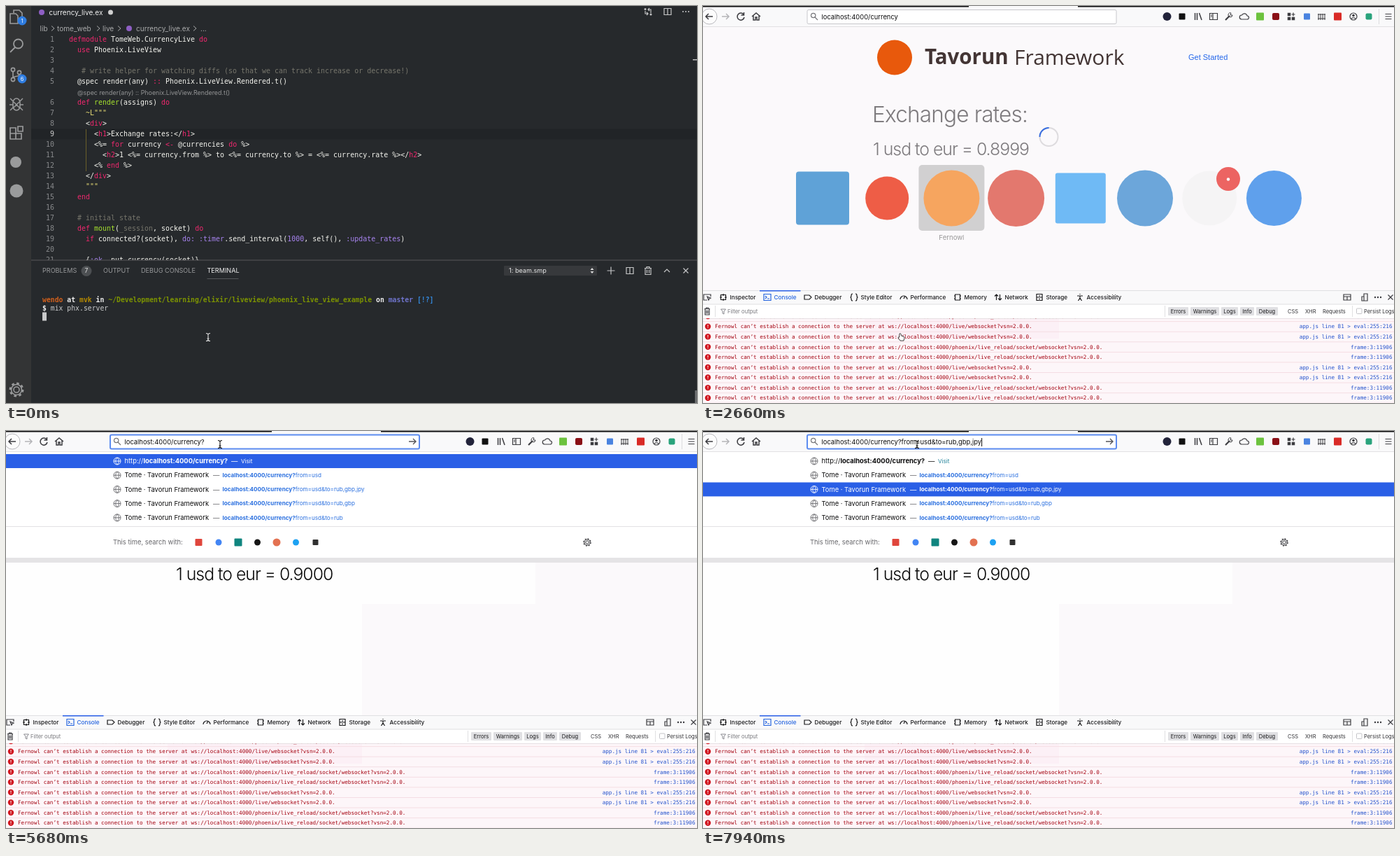
Animation of 988x567 px, one loop 8000 ms. Source, as an HTML page:

```html
<!DOCTYPE html>
<html lang="en">
<head>
<meta charset="utf-8">
<title>Currency live view</title>
<style>
  html, body { margin: 0; width: 100%; height: 100%; overflow: hidden; background: #26292c; }
  svg { display: block; }
  text { font-family: Inter, "Open Sans", sans-serif; white-space: pre; }
  .mono { font-family: "DejaVu Sans Mono", monospace; }
  .logo { font-family: "Open Sans", sans-serif; }
  .light { font-weight: 300; }
  .bold { font-weight: 700; }
  .end { text-anchor: end; }
  .mid { text-anchor: middle; }
</style>
</head>
<body>
<svg id="stage" width="988" height="567" viewBox="0 0 988 567">
  <defs>
    <clipPath id="codeClip"><rect width="988" height="363"/></clipPath>
    <clipPath id="logClip"><rect y="446" width="988" height="121"/></clipPath>
  </defs>
  <g id="editor"><g id="workbench"></g><g id="terminal"></g></g>
  <g id="browser"><g id="page"></g><g id="chrome"></g><g id="menu"></g><g id="address"></g><g id="caret"></g></g>
  <g id="switcher"></g>
  <g id="pointer"></g>
</svg>
<script>
const LOOP = 8000, STEP = 148.6;
const BLUE = '#2a5fe6', INK = '#0c0c0d', ICON = '#3c3c40';
const $ = id => document.getElementById(id);
const esc = s => s.replace(/&/g, '&amp;').replace(/</g, '&lt;');

const text = (x, y, s, size, fill, cls = '', extra = '') =>
  `<text x="${x}" y="${y}" dy=".35em" font-size="${size}" fill="${fill}" class="${cls}" ${extra}>${s}</text>`;
const span = (fill, s, cls = '') => `<tspan fill="${fill}" class="${cls}">${esc(s)}</tspan>`;
const rect = (x, y, w, h, fill, r = 0, extra = '') =>
  `<rect x="${x}" y="${y}" width="${w}" height="${h}" rx="${r}" fill="${fill}" ${extra}/>`;
const disc = (x, y, r, fill, extra = '') => `<circle cx="${x}" cy="${y}" r="${r}" fill="${fill}" ${extra}/>`;
const square = (x, y, size, fill, r = 1) => rect(x - size / 2, y - size / 2, size, size, fill, r);
const line = (x, y, d, color, width = 1.2, fill = 'none') =>
  `<path transform="translate(${x} ${y})" d="${d}" fill="${fill}" stroke="${color}" stroke-width="${width}"/>`;
const gear = (x, y, r, color, width) =>
  disc(x, y, r * .4, 'none', `stroke="${color}" stroke-width="${width}"`) +
  disc(x, y, r * .75, 'none', `stroke="${color}" stroke-width="${width}"`) +
  disc(x, y, r * .92, 'none', `stroke="${color}" stroke-width="${r * .25}" stroke-dasharray="${r * .36}"`);
const ring = r => `M${-r} 0a${r} ${r} 0 1 0 ${2 * r} 0a${r} ${r} 0 1 0 ${-2 * r} 0`;
const box = (w, h) => `M${-w / 2} ${-h / 2}h${w}v${h}h${-w}z`;

const last = {};
function set(id, html) {
  if (last[id] !== html) $(id).innerHTML = last[id] = html;
}

// Code editor
const CODE = `defmodule TomeWeb.CurrencyLive do
  use Phoenix.LiveView

   # write helper for watching diffs (so that we can track increase or decrease!)
  @spec render(any) :: Phoenix.LiveView.Rendered.t()
  def render(assigns) do
    ~L"""
    <div>
      <h1>Exchange rates:</h1>
      <%= for currency <- @currencies do %>
        <h2>1 <%= currency.from %> to <%= currency.to %> = <%= currency.rate %></h2>
      <% end %>
    </div>
    """
  end

  # initial state
  def mount(_session, socket) do
    if connected?(socket), do: :timer.send_interval(1000, self(), :update_rates)

    {:ok, put_currency(socket)}`.split('\n');
const TOKEN = /(#.*|~L|"""|\b(?:defmodule|use|def|end|for|if|do(?!:)|h[12]|div)\b|<-|::|(?<=def )\w+|do:|:[a-z]\w+|1000|_session)/;

function tokenColor(token) {
  if (token[0] === '#') return '#77766c';
  if (/^[~"]/.test(token)) return '#e6db74';
  if (/^(:[a-z]|do:|1000)/.test(token)) return '#a884f0';
  if (token === '_session') return '#77766c';
  return /render|mount/.test(token) ? '#a6e22e' : '#f0286e';
}
const highlight = s => s.split(TOKEN).map((p, i) => i % 2 ? span(tokenColor(p), p) : esc(p)).join('');

function drawWorkbench() {
  const grey = '#c5c6c7', dim = '#98999b', side = '#9a9b9c';
  const lineY = n => n < 6 ? 48 + 14.95 * (n - 1) : 138 + 14.95 * (n - 6);
  let s = rect(0, 0, 988, 567, '#26292c') + rect(0, 0, 36, 567, '#333435');
  s += rect(36, 175.5, 952, 15, '#212427') + rect(114, 176, 1, 60, '#6b5f2a');

  s += '<g clip-path="url(#codeClip)">' + CODE.map((row, i) =>
    text(69, lineY(i + 1), i + 1, 9.97, i === 8 ? '#d0d0d0' : '#87898b', 'mono end') +
    text(90, lineY(i + 1), highlight(row), 9.97, '#f4f4ee', 'mono')).join('') + '</g>';
  s += text(102, 124, '@spec render(any) :: Phoenix.LiveView.Rendered.t()', 8.9, '#949596');

  s += disc(51, 9, 4, '#8e5fc4') + text(61.5, 9, 'currency_live.ex', 10.1, '#f0f0f0') + disc(149.5, 9, 3.5, '#d0d0d0');
  [[48.5, 'lib'], [73, 'tome_web'], [138, 'live'], [186, 'currency_live.ex'], [278, '...']]
    .forEach(([x, name]) => s += text(x, 32, name, 10.1, '#a9aaab'));
  [67, 132, 162, 270].forEach(x => s += line(x, 32, 'M-2-3.5L2 0L-2 3.5', '#a9aaab', 1));
  s += disc(176, 32, 4, '#8e5fc4');

  s += line(918, 8, 'M-4-1V3h4M-2 1L0 3L-2 5M4 2V-3H0M2-5L0-3L2-1', grey) + disc(914, 4.5, 1.5, grey) + disc(922, 12, 1.5, grey);
  s += line(946, 8, box(10, 9) + 'M0-4.5v9', grey);
  [968, 972, 976].forEach(x => s += disc(x, 8, 1, grey));
  s += rect(982, 76, 6, 1.5, '#c0c0c0');

  // Activity bar
  s += line(15, 15, 'M-9-4h8l3 3V10H-9zM-4-5V-9H4L8-5V5H3', side, 1.6);
  s += line(15, 56, 'M-2 3L-9 10' + 'M-4-2a6.5 6.5 0 1 0 13 0a6.5 6.5 0 1 0-13 0', side, 1.8);
  s += line(14, 98, 'M-4-4V5M5 0C5 4-4 1-4 5', side, 1.6);
  [[10, 91], [10, 105], [19, 95]].forEach(([x, y]) => s += disc(x, y, 2.6, '#333435', `stroke="${side}" stroke-width="1.6"`));
  s += line(15, 140, 'M-5-2a5 6 0 0 1 10 0V3a5 6 0 0 1-10 0zM-9-8L-5-4M9-8L5-4M-10 1h5M5 1h5M-9 9L-5 5M9 9L5 5M-4-3L4 5M4-3L-4 5', side, 1.5);
  s += line(14, 182, 'M-8-8h8v16H-8zM-8 0H8V8H-8M3-10h7v7H3z', side, 1.7);
  s += disc(14, 223, 8, side) + disc(15, 264, 9.5, side) + gear(15, 548, 10, side, 1.6);
  [[21, 1], [104, 6]].forEach(([y, n]) => s += disc(23, y, 6.5, '#2f7de1') + text(23, y, n, 7.5, '#fff', 'mid'));

  // Panel header
  s += rect(36, 362.5, 952, 1, '#58595b');
  [[52, 'PROBLEMS'], [139, 'OUTPUT'], [193, 'DEBUG CONSOLE'], [287.5, 'TERMINAL']]
    .forEach(([x, name]) => s += text(x, 378, name, 9.1, x > 280 ? '#eee' : dim));
  s += rect(287.5, 389, 45, 1, '#55575a') + disc(115, 378.5, 7.5, '#4c4f52') + text(115, 378.5, 7, 8.5, '#e8e8e8', 'mid');
  s += rect(712, 371, 133, 14, '#37393c', 1) + text(719, 378, '1: beam.smp', 9.1, '#e8e8e8');
  s += line(838, 378, 'M-2.5-1L0-4L2.5-1zM-2.5 1L0 4L2.5 1z', 'none', 0, '#ddd');
  s += line(865, 378, 'M-5.5 0h11M0-5.5v11', grey) + line(892, 378, box(10, 9) + 'M0-4.5v9', grey);
  s += line(918, 378, 'M-5-3.5H5M-2-4V-5.5h4V-4M-4-3V5.5H4V-3M-1.5-1.5v5M1.5-1.5v5', grey);
  s += line(945, 378, 'M-4 2L0-2L4 2', grey) + line(972, 378, 'M-3.5-3.5l7 7M3.5-3.5l-7 7', grey);
  s += rect(985, 549, 3, 18, '#6a6c6e');
  set('workbench', s);
}

function drawTerminal(t) {
  const prompt = span('#d2601c', 'wendo', 'bold') + span('#eee', ' at ', 'bold') + span('#b58900', 'mvk', 'bold') +
    span('#eee', ' in ', 'bold') + span('#7d9400', '~/Development/learning/elixir/liveview/phoenix_live_view_example', 'bold') +
    span('#eee', ' on ', 'bold') + span('#6f74cc', 'master ', 'bold') + span('#3488dc', '[!?]', 'bold');
  const rows = [prompt, span('#eee', '$', 'bold') + ' mix phx.server'];
  if (t >= 990) rows.push('[info] Running TomeWeb.Endpoint with cowboy 2.6.3 at 0.0.0.0:4000 (http)');
  if (t >= 1130) rows.push('[info] Access TomeWeb.Endpoint at http://localhost:4000');
  if (t >= 1580) rows.push('', 'Webpack is watching the files…', '');
  const y = i => 420 + 11.75 * i;
  set('terminal', rows.map((row, i) => text(52, y(i), row, 9.79, '#c9cacb', 'mono')).join('') +
    rect(52, y(rows.length) - 6, 6, 12, '#c9cacb'));
}

// Browser
function drawChrome() {
  const grey = '#b5b5b8';
  let s = rect(0, 0, 988, 29, '#f9f9fa') + rect(0, 0, 380, 1.5, INK) + rect(536, 0, 452, 1.5, INK) + rect(0, 29, 988, 1, '#e2e1e3');
  s += disc(9, 15, 11, '#fcfcfc', 'stroke="#b9b9bd"') + line(9, 15, 'M5 0H-5M-1-4L-5 0L-1 4', ICON, 1.5);
  s += line(32, 15, 'M-5 0H5M1-4L5 0L1 4', grey, 1.5) + line(54, 15, 'M4-3A5 5 0 1 0 5 1M4.5-6v4h-4', ICON, 1.5);
  s += line(76, 15, 'M-6 0L0-5L6 0M-4-1V5h3V1h2v4h3V-1', ICON, 1.5);

  s += disc(663.5, 15, 6, '#22233a') + square(685, 15, 9, '#111');
  s += line(708, 15, 'M-4.5-5V5M-1.5-5V5M1.5-5L5 5', ICON, 1.5) + line(730, 15, box(11, 9) + 'M-1-4V4M-4-2h2M-4 0h2', ICON);
  s += line(752, 15, 'M-5 5L1-1', ICON, 2.2) + line(752, 15, 'M3-5A3 3 0 1 0 5-2L2-2z', ICON, 1);
  s += line(774, 15, 'M-4 4h8a2.5 2.5 0 0 0 0-5a4 4 0 0 0-7.5-1a3 3 0 0 0-.5 6z', ICON);
  s += square(796.5, 15, 11, '#6cc23e') + square(819, 15, 10, '#8a0f16', 2);
  [[838, 12], [838, 18], [844, 18]].forEach(([x, y]) => s += square(x, y, 4.5, ICON, 0));
  s += line(844, 12, 'M-2.5 0h5M0-2.5v5', ICON) + square(863.5, 15, 9, '#4a83e0');
  s += line(885, 15, 'M-5-4v9M-2-4v9M1-4v9M4-4v9M-6-3H5M-6 3H5', ICON, 1) + square(907.5, 15, 11, '#d92b27');
  s += disc(930, 15, 5, 'none', `stroke="${ICON}" stroke-width="1.2"`) + disc(930, 13.5, 1.8, ICON) + line(930, 15, 'M-3 3Q0 .5 3 3', ICON);
  s += square(952, 15, 9, '#29a37c', 2) + rect(966, 4, 1, 22, '#dcdcdf') + line(980, 15, 'M-4.5-3.5h9M-4.5 0h9M-4.5 3.5h9', ICON);
  set('chrome', s + drawDevtools());
}

function drawDevtools() {
  const glyphs = [
    [29, 'Inspector', box(7, 7) + 'M0-5v3M0 2v3M-5 0h3M2 0h3'], [92, 'Console', box(10, 9) + 'M-3-2l2 2l-2 2M0 2h3'],
    [150, 'Debugger', 'M-5-3H2L5 0L2 3H-5z'], [216, 'Style Editor', 'M-2-5q-2 0-2 2.5T-5.5 0Q-4 0-4 2.5T-2 5M2-5q2 0 2 2.5T5.5 0Q4 0 4 2.5T2 5'],
    [287, 'Performance', 'M-5 3a5 5 0 1 1 10 0M0 2L2-2'], [364, 'Memory', box(7, 8) + 'M-5-2h2M-5 2h2M3-2h2M3 2h2'],
    [422, 'Network', 'M-2.5 4V-4M-5-1.5L-2.5-4L0-1.5M2.5-4V4M0 1.5L2.5 4L5 1.5'], [481, 'Storage', box(8, 9) + 'M-4 0h8M-1-2h2M-1 2.5h2'],
    [539, 'Accessibility', 'M-4-2h8M0-2V1L-2.5 5M0 1L2.5 5M0-5v1']];
  let s = rect(0, 406, 988, 20, '#f9f9fa') + rect(0, 406, 988, 1, '#e0e0e2') + rect(0, 426, 988, 20, '#fff') +
    rect(0, 425.5, 988, 1, '#e0e0e2') + rect(0, 446, 988, 1, '#e6e0e3') + rect(81, 406, 58.5, 1.5, BLUE);
  s += line(6, 416, 'M0 4H-5V-4H5V-1M0-1l5 2l-2 1l-1 2z', ICON);
  glyphs.forEach(([x, name, d]) => {
    const color = name === 'Console' ? '#2464df' : '#18181a';
    s += line(x, 416, d, color) + text(x + 9.5, 416, name, 8.2, color, '', 'font-weight="500"');
  });
  s += line(921, 416, box(10, 8) + 'M-5-1H5M0-1V4', ICON) + line(946, 416, 'M-1-5H4V5H-1zM-4-1h3v6h-3z', ICON);
  [961, 965, 969].forEach(x => s += disc(x, 416, 1.2, ICON));
  s += line(983, 416, 'M-3.5-3.5l7 7M3.5-3.5l-7 7', ICON);

  s += line(6, 436, 'M-4-3.5H4M-1.5-4v-1h3v1M-3-3V5H3V-3M-1-1.5v5M1-1.5v5', ICON) + rect(17, 428, 1, 16, '#e0e0e2');
  s += line(29, 436, 'M-3.5-3h7L1 0V4L-1 3V0z', '#8a8a90', 1) + text(35, 436, 'Filter output', 7.6, '#77777c');
  [[665, 29, 'Errors'], [697, 41, 'Warnings'], [741, 24, 'Logs'], [768, 20, 'Info'], [791, 31, 'Debug']].forEach(([x, w, name]) =>
    s += rect(x, 430, w, 12, '#e0e0e3', 1) + text(x + w / 2, 436, name, 7.5, '#18181a', 'mid'));
  [[836, 'CSS'], [861, 'XHR'], [886, 'Requests'], [945, 'Persist Logs']].forEach(([x, name]) => s += text(x, 436, name, 7.5, '#303034'));
  s += rect(660, 428, 1, 16, '#e0e0e2') + rect(928, 428, 1, 16, '#e0e0e2') + rect(934.5, 432, 7.5, 7.5, '#fff', 1, 'stroke="#c4c4c8"');

  s += '<g clip-path="url(#logClip)">' + rect(0, 447, 988, 120, '#fdf6f9') + rect(231, 447, 278, 28, '#fcf0f6');
  for (let i = -1; i < 8; i++) {
    const y = 457.7 + 14.57 * i, reload = i & 2;
    const path = reload ? 'phoenix/live_reload/socket' : 'live';
    s += rect(0, y + 7, 988, 1, '#f5dde3') + disc(7, y, 4.2, '#d0151f') + rect(6.5, y - 2.5, 1, 3, '#fff') + rect(6.5, y + 1.3, 1, 1, '#fff');
    s += text(17, y, `Fernowl can’t establish a connection to the server at ws://localhost:4000/${path}/websocket?vsn=2.0.0.`, 7.62, '#a4000f', 'mono');
    s += text(985.5, y, reload ? 'frame:3:11906' : 'app.js line 81 &gt; eval:255:216', 7.62, '#2050cc', 'mono end');
  }
  return s + '</g>';
}

function drawPage(t, clock) {
  const online = t >= 4940, settled = t >= 2960;
  const color = online ? '#0a0a0a' : '#7d7a7d';
  let s = rect(0, 30, 988, 376, '#fbf9fb');
  if (settled) s += rect(0, 30, 509, 376, '#fefefe');
  if (online) s += rect(231, 30, 526, 217, '#fefefe');
  if (settled) s += rect(0, 112.5, online ? 757 : 509, 1, '#e6e5e6');
  if (settled && !online) s += rect(231, 128, 278, 118.5, '#fcf0f6');
  s += disc(274, 73.5, 25, '#e8590c');
  s += text(317, 73, 'Tavorun', 29.5, '#433534', 'logo bold') + text(445, 73, 'Framework', 30, '#433534', 'logo');
  s += text(694, 73, 'Get Started', 11, '#2668ea', '', 'style="font-family:\'Liberation Sans\',sans-serif"');
  s += text(242, 155, 'Exchange rates:', 31.5, color, 'light', 'letter-spacing="-.8"');
  s += text(243, 204, `1 usd to eur = ${online ? '0.9000' : '0.8999'}`, 24.8, color, 'light', 'letter-spacing="-1"');
  if (!online) {
    const angle = 180 + (clock - 2660) * .45;
    s += disc(494.5, 187, 13, 'none', 'stroke="#dddbde" stroke-width="2"') +
      disc(494.5, 187, 13, 'none', `stroke="#3a6fe0" stroke-width="2" stroke-dasharray="20.4 62" transform="rotate(${angle} 494.5 187)"`);
  }
  set('page', s);
}

function drawAddress(t) {
  const focused = t >= 4650, selected = focused && t < 5090;
  let url = 'localhost:4000/currency';
  if (t >= 5680) url += '?';
  if (t >= 6450) url += 'from=usd';
  if (t >= 6600) url += '&to=rub,gbp,jpy';
  set('address', rect(149, 5.5, 442, 20, '#fff', 2, focused ? 'stroke="#5d8cf0" stroke-width="2"' : 'stroke="#c8c8cc"') +
    line(159, 15, 'M1 1L5 5M-4.5-1.5a3.2 3.2 0 1 0 6.4 0a3.2 3.2 0 1 0-6.4 0', '#77777b') +
    (focused ? line(581, 15, 'M-5 0H5M1-4L5 0L1 4', '#55555a', 1.4) : '') +
    (selected ? rect(169.5, 9, 109, 13, '#b4d5fe') : '') +
    text(169.5, 15.5, esc(url), 9.4, INK, '', 'id="url"'));
  const caretOn = (t >= 6150 && t < 6450) || (t >= 6740 && t < 7340) || t >= 7940;
  set('caret', caretOn ? rect(169.5 + $('url').getComputedTextLength(), 10, 1, 12, INK) : '');
}

function drawMenu(t) {
  if (t < 5680) return set('menu', '');
  const active = t < 6450 ? 0 : t < 6600 ? 1 : 2;
  const queries = [null, 'from=usd', 'from=usd&to=rub,gbp,jpy', 'from=usd&to=rub,gbp', 'from=usd&to=rub'];
  const host = 'localhost:4000/currency?';
  let s = rect(0, 30, 988, 151, '#fff') + rect(0, 181, 988, 7, '#e5e4e6') + rect(0, 136, 988, 1, '#e2e1e3');
  queries.forEach((query, i) => {
    const y = 43 + 20.2 * i, on = i === active;
    const ink = on ? '#fff' : INK, link = on ? '#fff' : '#2a6fdf';
    if (on) s += rect(0, y - 10, 988, 20, BLUE);
    s += line(159, y, ring(5) + 'M-5 0H5M0-5C-3-2-3 2 0 5C3 2 3-2 0-5', on ? '#fff' : '#66666a', .9);
    if (i) {
      s += text(169.5, y, 'Tome · Tavorun Framework', 9.4, ink) + text(296, y, '—', 9.4, on ? '#fff' : '#66666a') +
        text(309.5, y, span(link, host, 'bold') + span(link, query), 8.1, link);
    } else {
      s += text(169.5, y, 'http://' + span(ink, host, 'bold'), 9.4, ink) + text(322, y, '—', 9.4, ink) +
        text(336, y, 'Visit', 8.1, on ? '#fff' : '#22829a');
    }
  });
  s += text(153, 159, 'This time, search with:', 9.4, '#66666a') + gear(831, 159, 5.5, ICON, 1);
  s += square(275.5, 159, 10, '#e0463c') + disc(304, 159, 4.5, '#4285f4') + square(332, 159, 11, '#10857f') +
    disc(359.5, 159, 4.5, '#161616') + disc(387, 159, 5.5, '#e37151') + disc(414.5, 159, 4.5, '#1da1f2') + square(442.5, 159, 8, '#303030');
  set('menu', s);
}

// Application switcher
function drawSwitcher(t) {
  if (t < 1580 || t >= 2960) return set('switcher', '');
  const fading = t >= 2660, index = t < 2180 ? 1 : 2;
  const x = i => 171 + 92.2 * i, y = 274.5;
  const icons = square(x(0), y, 76, '#2b86cb', 4) + disc(x(1), y, 31, '#ea2a0a') + disc(x(2), y, 40, '#f58a2c') +
    disc(x(3), y, 40.5, '#dc4d3f') + square(x(4), y, 72, '#41a5f3', 3) + disc(x(5), y, 40, '#3d8bd0') +
    disc(x(6), y, 39, '#f4f3f4') + disc(751, 247, 17, '#e8332f') + disc(751, 247.5, 2.2, '#fff') + disc(x(7), y, 39.5, '#2c83e8');
  set('switcher', `<g opacity="${!fading ? 1 : t < 2810 ? .75 : .25}">` +
    (fading ? '' : rect(111, 210, 766, 129, '#6c6d6f', 14, 'opacity=".97"')) +
    rect(x(index) - 47, 227, 94, 94, '#000', 5, `opacity="${fading ? .22 : .38}"`) + icons +
    text(x(index), 331, index === 1 ? 'LICEcap' : 'Fernowl', 9.6, fading ? '#777' : '#000', 'mid') + '</g>');
}

// Pointer
const PATH = [[0, 289, 473], [1129, 289, 473], [1130, 283, 473], [2810, 283, 473], [3560, 210, 196], [3760, 210, 196], [4500, 306, 19]];
function along(path, t) {
  const i = path.findIndex(p => p[0] > t);
  if (i < 0) return path[path.length - 1].slice(1);
  const [a, b] = [path[i - 1], path[i]], k = (t - a[0]) / (b[0] - a[0]);
  const ease = k * k * (3 - 2 * k);
  return [a[1] + (b[1] - a[1]) * ease, a[2] + (b[2] - a[2]) * ease];
}

function drawPointer(t, clock) {
  const [x, y] = along(PATH, clock);
  const beam = 'M-3-5.5Q0-5.5 0-3.5V3.5Q0 5.5-3 5.5M3-5.5Q0-5.5 0-3.5M0 3.5Q0 5.5 3 5.5M-1.5 2h3';
  const hand = 'M-2-5q1.5-1 2 .5L.5-2L4-1q1 .5 .8 2.5L4 5H-1L-4 1q0-1.5 1.5-.8z';
  const arrow = 'M0-6V5L2.5 2.5L4.5 7L6.5 6L4.5 2H8z';
  set('pointer', t < 1130 ? line(x, y, beam, '#e4e4e4', 1.1) :
    t < 2960 ? line(x, y, hand, '#111', .8, '#fff') :
    t < 4350 ? line(x, y, arrow, '#fff', .8, '#000') : line(x, y, beam, '#111', 1.1));
}

function frame(now) {
  const t = now % LOOP;
  const base = t < 3760 ? 2660 : 3760;
  const clock = t < 2660 ? t : base + Math.floor((t - base) / STEP) * STEP;
  const browsing = t >= 2660;
  $('editor').style.display = browsing ? 'none' : '';
  $('browser').style.display = browsing ? '' : 'none';
  if (browsing) {
    drawPage(t, clock);
    drawMenu(t);
    drawAddress(t);
  } else drawTerminal(t);
  drawSwitcher(t);
  drawPointer(t, clock);
  requestAnimationFrame(frame);
}

drawWorkbench();
drawChrome();
requestAnimationFrame(frame);
</script>
</body>
</html>
```
